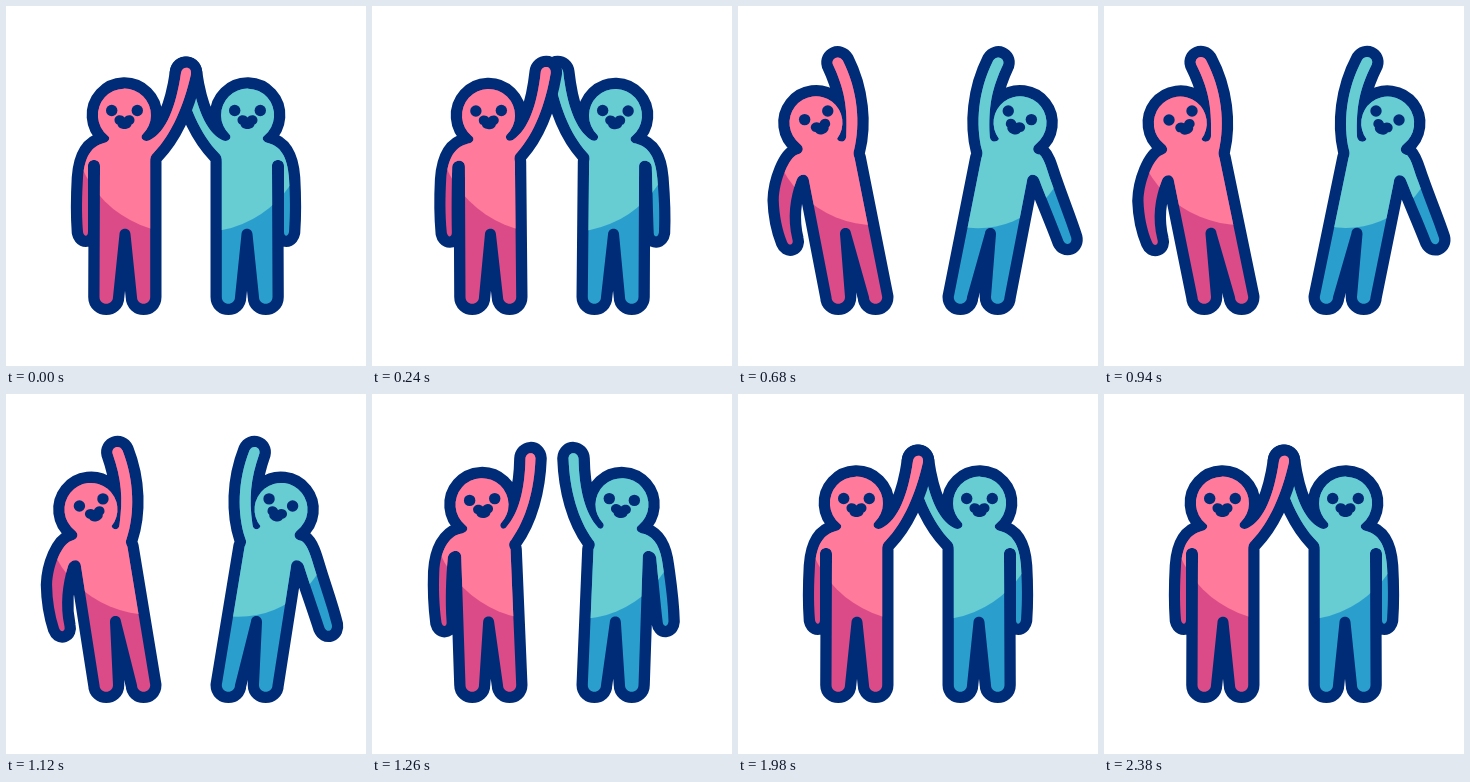
An HTML page with a canvas for the animation above (2400 ms loop, 360 by 360 pixels).

```html
<!DOCTYPE html>
<html lang="en">
<head>
<meta charset="utf-8">
<title>High five</title>
<style>
  html, body { margin: 0; width: 100%; height: 100%; overflow: hidden; background: #fff; }
  canvas { display: block; width: 360px; height: 360px; }
</style>
</head>
<body>
<canvas id="stage" width="360" height="360"></canvas>
<script>
const LOOP = 2400, NAVY = '#002c77', YELLOW = '#f9ca6b';
const ctx = document.getElementById('stage').getContext('2d');

// Each body part as [upright, leaning]; joined in order they form one closed outline
const ARM_IN = 'M98,137 C86,140 78.5,150 77,172 C76,190 75.5,205 77,226 C78,231 82,231 82,226 C82,205 82,180 82,160 ';
const ARM_BENT = 'M58,149 C50,152 40,175 39.5,195 C40,210 43,224 48,236 C50,241 55,239 53.5,234 C48,212 51,192 58,174 ';
const ARM_WIDE = 'M57,149 C52,154 50,165 46,175 C39,195 31,214 25,232 C23.5,238 30,241 33,235 C42,212 51,192 58,174 ';
const TORSO = [
  'C82,152 94,152 94,160 L93.5,291 C93.5,300 107,300 107,291 L113.5,228 C114,221 124,221 124.5,228 ' +
  'L131,291 C131,300 144.2,300 144.2,291 L144.2,156 ',
  'C60,168 69,167 70,175 L93.5,291 C93.5,300 107,300 107,291 L101.5,228 C101.5,220 112,220 112.5,227 ' +
  'L131,291 C131,300 144.2,300 144.2,291 L115.5,152 '
];
const REACH = [
  'C144,152 145,149 147.5,147 C166,128 178,99 185,68 C186,60 176,60 175,67 C170,101 160,126 144,134 ',
  'C114.5,149 114,147 115,144 C121,118 118,84 102,54 C98,48 90,52 92,58 C104,82 108,100 107,130 '
];
const HEAD = [
  'C138,137 133.5,132 136.5,128.5 A26.5,26.5 0 1 0 101.5,129.5 C105,132 103,136 98,137 Z',
  'C106.5,137 99,137 97.5,133 A26.5,26.5 0 1 0 60,138 C65,142 64,147 58,149 Z'
];
const MOUTH = new Path2D('M0,-4 C-3,-8 -10,-6.5 -10,-1.5 C-10,1 -8.5,2.5 -7,3 C-6,9 6,9 7,3 C8.5,2.5 10,1 10,-1.5 C10,-6.5 3,-8 0,-4 Z');

const PINK = { light: '#ff7a9b', dark: '#db4b87', arm: [ARM_IN, ARM_BENT], glow: [[176.5, 117.4, 110], [137, 112, 107]] };
const TEAL = { light: '#68cdd2', dark: '#2a9fcd', arm: [ARM_IN, ARM_WIDE], glow: [[165, 118, 108.2], [118, 131, 91]] };

const mix = (a, b, k) => a + (b - a) * k;
const mixAll = (a, b, k) => a.map((v, i) => mix(v, b[i], k));
const span = (t, from, to) => Math.min(1, Math.max(0, (t - from) / (to - from)));
const easeInOut = u => u < .5 ? 4 * u ** 3 : 1 - 4 * (1 - u) ** 3;
const easeOut = u => 1 - (1 - u) ** 3;

function mixPath([a, b], k) {
  const ends = b.match(/[\d.]+/g);
  let i = 0;
  return a.replace(/[\d.]+/g, n => mix(+n, +ends[i++], k));
}

function disc(x, y, r) {
  ctx.beginPath();
  ctx.arc(x, y, r, 0, 7);
  ctx.fill();
}

function drawPerson({ light, dark, arm, glow }, lean) {
  const sway = lean ** 1.2; // torso and head follow the arms a little late
  const body = new Path2D(mixPath(arm, lean) + mixPath(TORSO, sway) + mixPath(REACH, lean) + mixPath(HEAD, sway));
  ctx.lineWidth = 22.6;
  ctx.lineJoin = 'round';
  ctx.strokeStyle = NAVY;
  ctx.stroke(body);
  ctx.fillStyle = dark;
  ctx.fill(body);

  ctx.save();
  ctx.clip(body);
  ctx.fillStyle = light;
  disc(...mixAll(...glow, sway));
  ctx.restore();

  ctx.fillStyle = NAVY;
  disc(...mixAll([105.7, 104.5, 5.7], [65, 114, 5.7], sway));
  disc(...mixAll([131.3, 104.5, 5.7], [88, 105, 5.7], sway));
  ctx.save();
  ctx.translate(...mixAll([118.5, 115.5], [81.5, 121], sway));
  ctx.rotate(-.37 * sway);
  ctx.fill(MOUTH);
  ctx.restore();
}

function drawSparks(t) {
  const grow = easeOut(span(t, 1480, 1560));
  const size = grow * (1 - span(t, 1640, 1800));
  if (!size) return;
  const reach = mix(14, 29, grow) + 2 * span(t, 1560, 1640);
  ctx.fillStyle = YELLOW;
  for (const angle of [-1.24, -.79, -.32]) {
    ctx.beginPath();
    ctx.ellipse(186.5 + reach * Math.cos(angle), 62 + reach * Math.sin(angle), 8 * size, 6.2 * size, angle, 0, 7);
    ctx.fill();
  }
}

function draw(now) {
  const t = now % LOOP;
  const lean = easeInOut(span(t, 20, 850)) - easeInOut(span(t, 920, 1490));
  ctx.clearRect(0, 0, 360, 360);
  ctx.save();
  ctx.translate(360, 0);
  ctx.scale(-1, 1);
  drawPerson(TEAL, lean);
  ctx.restore();
  drawPerson(PINK, lean);
  drawSparks(t);
}

const start = performance.now();
function tick() {
  draw(performance.now() - start);
  requestAnimationFrame(tick);
}
tick();
</script>
</body>
</html>
```
